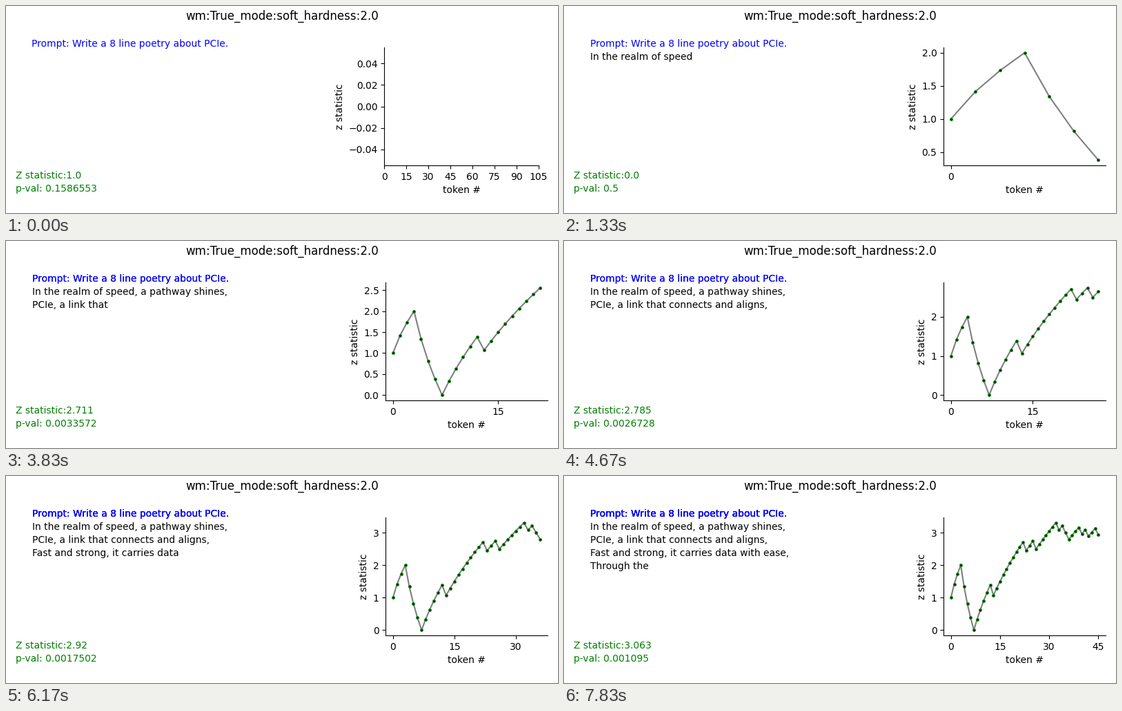
These frames come from a looping animation (800 px wide and 300 px high, 8 s). A matplotlib script:

```python
import math

import matplotlib.pyplot as plt
import numpy as np
from matplotlib.animation import FuncAnimation

W, H, DPI = 800, 300, 100
LOOP_MS, FRAMES = 8000, 48

PROMPT = "Prompt: Write a 8 line poetry about PCIe."
TOKENS = (
    "In| the| real|m| of| speed|,| a| path|way| sh|ines|,|\n|"
    "P|CI|e|,| a| link| that| connect|s| and| al|igns|,|\n|"
    "F|ast| and| strong|,| it| car|ries| data| with| e|ase|,|\n|"
    "T|hr|ough| the| system"
).replace("car|ries", "carries").split("|")

# Lengths of alternating runs of green (+1) and red (-1) tokens
RUNS = [4, 4, 5, 1, 9, 1, 2, 1, 6, 1, 1, 2, 3, 1, 1, 1, 2, 1, 2]
steps = np.repeat([(-1) ** i for i in range(len(RUNS))], RUNS)
count = np.arange(1, len(steps) + 1)
z = np.cumsum(steps) / np.sqrt(count)

LEFT, TOP, LINE = 14.5, 59, 19
MAX_LINES = 4

fig = plt.figure(figsize=(W / DPI, H / DPI), dpi=DPI, facecolor="white")
fig.suptitle("wm:True_mode:soft_hardness:2.0")


def label(x, y, color, text=""):
    """Text with its baseline y pixels below the top edge."""
    return fig.text(x / W, 1 - y / H, text, color=color, fontsize=10)


prompts = [label(38, TOP, "blue", PROMPT) for _ in range(MAX_LINES)]
lines = [label(38, TOP + LINE * (i + 1), "black") for i in range(MAX_LINES)]
z_text = label(LEFT, 250, "green")
p_text = label(LEFT, 269, "green")

ax = fig.add_axes([0, 0, 1, 1])
ax.spines[["top", "right"]].set_visible(False)
ax.set_xticks(range(0, 106, 15))
ax.set_xlabel("token #")
ax.set_ylabel("z statistic")
curve, = ax.plot([], [], color="gray", lw=1.5, marker=".", ms=5,
                 mfc="black", mec="green")


def place(x0, x1):
    ax.set_position([x0 / W, 0.23, (x1 - x0) / W, 0.57])


def draw(n):
    curve.set_data(np.arange(n), z[:n])
    if n == 0:
        place(548.2, 772)
        ax.set_xlim(0, 105)
        ax.set_ylim(-0.055, 0.055)
    else:
        place(550.1, 785)
        ax.relim()
        ax.autoscale(True)
        ax.autoscale_view()

    poem = "".join(TOKENS[:max(n - 1, 0)]).split("\n")
    for i, (prompt, line) in enumerate(zip(prompts, lines)):
        # the prompt is painted once more for every line begun
        prompt.set_visible(i < len(poem))
        prompt.set_x((38 if n else 37) / W)
        line.set_text(poem[i] if i < len(poem) else "")

    score = float(z[n])
    p_value = 0.5 * math.erfc(score / math.sqrt(2))
    z_text.set_text(f"Z statistic:{round(score, 3)}")
    p_text.set_text(f"p-val: {round(p_value, 7)}")
    return [curve, *prompts, *lines, z_text, p_text]


anim = FuncAnimation(fig, draw, frames=FRAMES, interval=LOOP_MS / FRAMES,
                     init_func=lambda: draw(0), repeat=True, repeat_delay=0,
                     blit=False)
plt.show()
```
